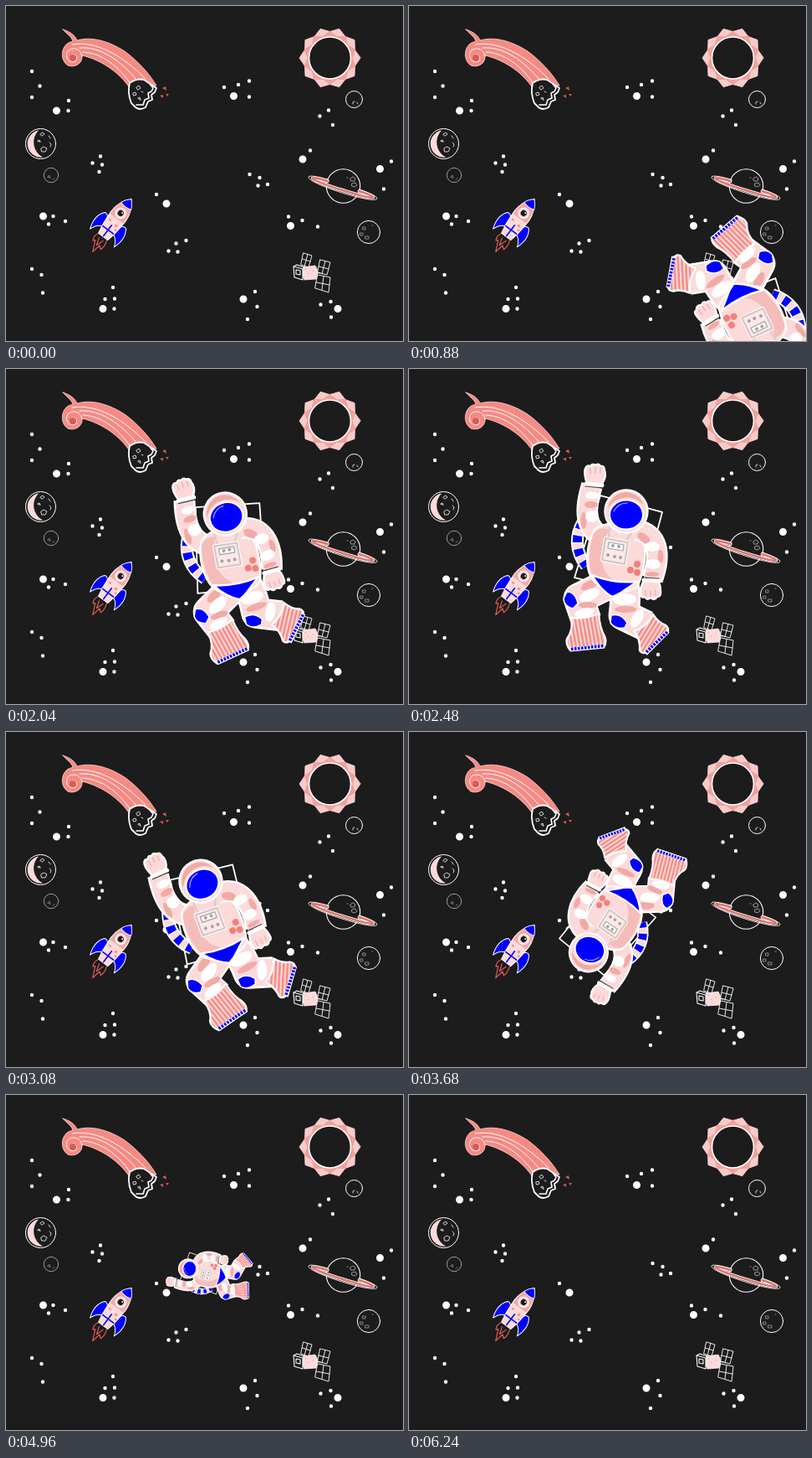
Animation of 475x400 px, one loop 6800 ms. Source, as an HTML page:

```html
<!DOCTYPE html>
<html lang="en">
<head>
<meta charset="utf-8">
<title>Drifting astronaut</title>
<style>
html, body { margin: 0; width: 100%; height: 100%; overflow: hidden; background: #1c1c1c; }
svg { display: block; width: 100%; height: 100%; stroke-linecap: round; stroke-linejoin: round; }
.n { fill: none; }
.bg { fill: #1c1c1c; }
.w { fill: #fff; }
.l { fill: #fbdad9; }
.m { fill: #f2aaa7; }
.s { fill: #f68a83; }
.b { fill: #00f; }
.k { stroke: #fff; }
.thin { stroke: #fff; stroke-width: .8; fill: none; }
.fat { stroke: #fff; stroke-width: 2.4; }
.flat { stroke-linecap: butt; }
.arm, .skin { fill: none; stroke-linecap: butt; }
.arm { stroke: #fff; stroke-width: 26; }
.skin { stroke: #fbdad9; stroke-width: 21; }
.leg .arm { stroke-width: 37; }
.leg .skin { stroke-width: 32; }
</style>
</head>
<body>
<svg viewBox="0 0 475 400">
<defs>
  <pattern id="rib" width="4.6" height="8" patternUnits="userSpaceOnUse" patternTransform="rotate(-10)">
    <path d="M0 0h4.6v8h-4.6z" class="l"/><path d="M0 0h2.5v8h-2.5z" class="s"/>
  </pattern>
  <pattern id="rib2" width="4.6" height="8" patternUnits="userSpaceOnUse" patternTransform="rotate(32)">
    <path d="M0 0h4.6v8h-4.6z" class="l"/><path d="M0 0h2.5v8h-2.5z" class="s"/>
  </pattern>
  <path id="hose" class="n" d="M208 183C199 198 198 217 212 235"/>
  <path id="armUp" d="M234 202C209 191 210 167 219 139"/>
  <path id="armLow" d="M271 192C298 196 302 222 291 251"/>
  <path id="legL" d="M236 258L203 274 212 300"/>
  <path id="legR" d="M257 256Q260 274 257 294L284 307"/>
</defs>

<!-- stars -->
<path class="n k" stroke-width="4.4" d="M31 78h0M40.5 95.5h0M31 109h0M75 113h0M74.500 125h0M113 179.500h0M103.500 187.500h0M115 189.500h0M111.500 198h0M56.500 251h0M51 260.500h0M71 257h0M31 314h0M42.500 321h0M44 342.500h0M128 336h0M118.500 350h0M130 349.500h0M129.500 361.500h0M180 225h0M215.500 280h0M203.500 283.500h0M205.500 293.500h0M194.500 292.500h0"/>
<path class="n k" stroke-width="4.4" d="M261 97h0M278 94h0M291 89.500h0M291 108.500h0M386 124.500h0M375.500 131.500h0M391 142h0M291.500 201h0M303.500 205h0M301.500 214.500h0M313 213h0M364 172.500h0M461 185.500h0M452 218.500h0M338 251.500h0M354.500 256h0M373 263.500h0M298 341h0M300.500 359h0M289 374h0M388.500 353h0M376.500 356.500h0M389 371.500h0"/>
<path class="n k" stroke-width="9" d="M60.500 125h0M44.500 251h0M116 361.500h0M192 236h0M272.500 107.500h0M355 183h0M447.500 194.500h0M340.500 262.500h0M284 350h0M397 361.500h0"/>

<!-- comet -->
<path class="s" stroke="#fbdad9" stroke-width=".8" d="M68 28C78 31 83 36 85 41 103 36 123 42 142 54 158 66 171 80 180 95L148 98C137 81 116 65 91 59 92 69 82 74 74 71 66 66 65 53 72 46 75 43 78 43 80 42 78 36 72 33 68 28Z"/>
<path class="n" stroke="#fff" stroke-width="1" d="M91 60C90 51 79 48 74 54 69 62 77 69 83 66 88 60 80 55 77 60M79 46C108 41 139 59 167 87M88 50C113 48 137 65 157 89M92 55C115 56 136 73 149 93"/>
<circle cx="80" cy="62" r="4" fill="#d95b55"/>
<path class="bg k" stroke-width="1.800" d="M148 92Q156 86 165 88L171 92 180 98 178 103 174 106 175 112 170 114 167 121Q160 125 155 121L150 116Q145 104 148 92Z"/>
<path class="n k" stroke-width="1.600" d="M172 93L176 98 174 102 170 104 171 110 166 112 164 118 156 118"/>
<path class="thin" d="M156 97l3-2 2 3-3 2zM152 104l3-1 1 3-3 1zM162 102l2 1M158 110l2-1 1 3z"/>
<path fill="#d9564f" d="M187 98l4-2 1 5zM191 105l4 0-2 3zM184 107l4-1 0 4z"/>

<!-- sun -->
<path id="rays" fill="#f8cac8" stroke="#fbdad9" stroke-width=".8"/>
<path id="rays2" fill="#f0a19d"/>
<circle class="bg k" stroke-width="1.600" cx="387.500" cy="62" r="25"/>

<!-- planets -->
<g class="bg k" stroke-width="1">
  <circle cx="416.500" cy="111.500" r="10"/>
  <circle cx="41.500" cy="164.500" r="18"/>
  <circle cx="54" cy="202" r="8.700" style="stroke:#999"/>
  <circle cx="434" cy="270" r="13.600"/>
</g>
<path class="l" d="M39 148.500A16.200 16.200 0 0 0 44 180.500 20 20 0 0 1 39 148.500Z"/>
<path class="thin" d="M41 153l3-2 2 2-3 2zM51 155l2 3M42 170l3-2 4 2-2 4-4 0zM52 163l2 2-1 3M38 161l2-1 1 2zM415 117q-1-3 2-3M420 115l1 2"/>
<path class="n" stroke="#999" stroke-width=".7" d="M50 204l2-2 1 3zM56 207l2-1"/>
<path class="n" stroke="#ccc" stroke-width=".6" d="M427 264h3v3h-3zM424 271h3v3h-3zM430 275h4v3h-4zM438 262h1"/>
<circle class="bg k" stroke-width="1.100" cx="403.500" cy="215" r="20.200"/>
<path class="n" stroke="#ccc" stroke-width=".7" d="M412 206l3-2 3 2-1 3-4 0zM414 212l4-1 2 3-3 2-3-1zM408 205h1"/>
<g transform="translate(403 217) rotate(17.500)" fill="none">
  <path class="k" stroke-width=".8" d="M-19-4C-34-4-43-2-43 0 -43 8 43 8 43 0 43-2 34-4 19-4"/>
  <path stroke="#fff" stroke-width="4.200" d="M-20-2C-31-2-38-1-38 0 -37 4 37 4 38 0 38-1 31-2 20-2"/>
  <path stroke="#e0736c" stroke-width="2.600" d="M-20-2C-31-2-38-1-38 0 -37 4 37 4 38 0 38-1 31-2 20-2"/>
</g>

<!-- rocket -->
<g transform="translate(130 257) rotate(37)">
  <path class="bg" stroke="#dc5a52" stroke-width="1.200" d="M-7 24Q-10 29-7 34L-5 32 1 45 3 34 7 37Q9 31 6 24M-3 27L0 36 3 27"/>
  <path class="b k" stroke-width="1" d="M-9 2Q-13-3-16-1-24 9-18 25-15 16-9 14ZM9 2Q13-3 16-1 24 9 18 25 15 16 9 14Z"/>
  <path class="l k" stroke-width="1" d="M0-33Q10-23 10.500-8 10 9 7 23H-7Q-10 9-10.500-8-10-23 0-33Z"/>
  <path class="m" d="M-7-23Q-10-15-9.800-4L9.800-4Q10-16 7-23Z"/>
  <path class="b k" stroke-width=".8" d="M0-33Q5-29 7.500-23Q0-20-7.500-23-5-29 0-33Z"/>
  <circle class="l k" cy="-12" r="6.200"/><circle class="bg" cy="-12" r="3.600"/><circle class="w" cx="1.400" cy="-13.500" r="1"/>
  <path class="n" stroke="#00f" stroke-width="1.600" d="M0 6V22M-8 13H8"/>
  <path class="s" d="M3 2h3v3h-3zM6 7h3v2h-3zM-7 1h3v2h-3z"/>
</g>

<!-- satellite -->
<path class="bg k" stroke-width=".9" d="M356 295L366 298 362 312 353 309ZM361 296.500L357 311M354.500 302L364 305M376 303L388 306 384 321 373 318ZM382 304.500L378 320M374 311L386 314M373 321L388 324 386 342 370 337ZM380 323L378 339M371 330L387 333"/>
<path class="n k" stroke-width="1" d="M368 318l8 1"/>
<path class="l k" stroke-width=".7" d="M356 312L370 310Q375 317 371 326L357 327Q353 319 356 312Z"/>
<path class="bg k" stroke-width="1.100" d="M344 311L355 314 355 327 345 324ZM347 315l5 1v5l-5-1zM344 311L348 309 357 312"/>
<path class="s" d="M358 314h1v1h-1zM361 319h1v1h-1zM367 316h1v1h-1z"/>

<!-- astronaut, drawn around its middle -->
<g id="man" visibility="hidden"><g transform="translate(-247 -225)">
  <path class="bg k" stroke-width="1.800" d="M229 151L303 171 277 268 198 249Z"/>
  <g class="flat">
    <use href="#hose" stroke="#fff" stroke-width="15"/>
    <use href="#hose" stroke="#fbdad9" stroke-width="11"/>
    <use href="#hose" stroke="#fff" stroke-width="11" stroke-dasharray="10.500 5.500"/>
    <use href="#hose" stroke="#00f" stroke-width="11" stroke-dasharray="8 8" stroke-dashoffset="-1.200"/>
  </g>

  <g class="leg">
    <use href="#legR" class="arm"/><use href="#legR" class="skin"/>
    <use href="#legL" class="arm"/><use href="#legL" class="skin"/>
  </g>
  <ellipse class="m" cx="216" cy="258" rx="11" ry="5" transform="rotate(-25 216 258)"/>
  <ellipse class="w" cx="216" cy="270" rx="13" ry="7" transform="rotate(-25 216 270)"/>
  <ellipse class="m" cx="214" cy="282" rx="11" ry="4"/>
  <ellipse class="w" cx="210" cy="291" rx="12" ry="5.500" transform="rotate(-12 210 291)"/>
  <ellipse class="w" cx="258" cy="275" rx="14" ry="7"/>
  <ellipse class="m" cx="259" cy="287" rx="13" ry="4"/>
  <ellipse class="w" cx="273" cy="298" rx="12" ry="6" transform="rotate(-60 273 298)"/>
  <path class="b k" stroke-width="1.500" d="M189 266Q199 266 202 280L196 286Q185 283 185 274Z"/>
  <path class="b k" stroke-width="1.500" d="M242 294Q254 291 261 303L258 309Q246 311 241 303Z"/>

  <path class="fat" fill="url(#rib)" d="M194 297Q211 299 227 292 228 309 234 319 237 327 233 332L193 336Q187 328 189 322 197 312 194 297Z"/>
  <path class="n k flat" stroke-width="5" d="M193 335L234 331"/>
  <path class="n flat" stroke="#00f" stroke-width="3.600" stroke-dasharray="2.600 1.400" d="M194 334.500L233 330.500"/>
  <path class="fat" fill="url(#rib2)" d="M270 313Q284 308 292 293 298 303 307 306 312 310 309 315L285 338Q279 341 276 336 277 324 270 313Z"/>
  <path class="n k flat" stroke-width="5" d="M283 340L310 313"/>
  <path class="n flat" stroke="#00f" stroke-width="3.600" stroke-dasharray="2.600 1.400" d="M284 338L309 314"/>

  <use href="#armUp" class="arm"/><use href="#armUp" class="skin"/>
  <ellipse class="m" cx="209" cy="181" rx="3.500" ry="10"/>
  <ellipse class="w" cx="219" cy="176" rx="8" ry="7"/>
  <ellipse class="m" cx="218" cy="162" rx="8" ry="4"/>
  <ellipse class="w" cx="219" cy="151" rx="8" ry="4.500"/>

  <path class="l fat" d="M222 192C235 180 272 182 281 199 285 220 281 243 273 260 254 272 230 266 218 249 209 232 214 205 222 192Z"/>
  <path class="m" d="M221 196Q231 187 240 192 229 207 231 232 234 245 243 251 228 251 219 246 212 222 221 196Z" opacity=".6"/>
  <path class="b fat" d="M219 246Q244 256 273 254L258 264Q252 269 243 272 229 264 219 246Z"/>

  <use href="#armLow" class="arm"/><use href="#armLow" class="skin"/>
  <ellipse class="m" cx="281" cy="202" rx="9" ry="5" transform="rotate(40 281 202)"/>
  <ellipse class="w" cx="291" cy="212" rx="9" ry="6"/>
  <ellipse class="m" cx="301" cy="224" rx="3.500" ry="8"/>
  <ellipse class="w" cx="292" cy="233" rx="9" ry="6"/>
  <ellipse class="m" cx="291" cy="245" rx="8" ry="3"/>
  <path class="n" stroke="#f3807a" stroke-width="8" d="M265 240h0M273 233h0M273 243h0"/>

  <path class="n" stroke="#d8cfcf" stroke-width="2.400" d="M239 203L240 188M259 206L268 193"/>
  <path fill="#fbe8e7" stroke="#fff" stroke-width="4" d="M235 202L262 207 258 233 231 228Z"/>
  <path fill="#fbe8e7" stroke="#cfc6c6" stroke-width="2" d="M235 202L262 207 258 233 231 228Z"/>
  <path fill="#fff" stroke="#a9a0a0" stroke-width="1.200" d="M239 207L257 210 256 217 238 214Z"/>
  <path class="n" stroke="#aaa1a1" stroke-width="4" d="M244 211h0M251 212h0M238 222h0M246 224h0M253 225h0"/>

  <ellipse class="l fat" cx="260" cy="170" rx="25.500" ry="25.500"/>
  <path class="m" d="M238 167A22 22 0 0 1 281 163 26 26 0 0 0 238 167Z"/>
  <ellipse class="b k" stroke-width="2" cx="260" cy="174" rx="20" ry="17.500"/>
  <path class="n" stroke="#bcbcff" stroke-width="1" d="M245 170Q250 160 261 160"/>

  <path class="l fat" d="M213 137Q208 122 212 117 215 114 217 117 219 112 223 115 227 112 229 116 234 115 234 121 237 128 231 137Z"/>
  <path class="n" stroke="#f2aaa7" stroke-width="1.200" d="M217 118v7M223 117v7M229 118v6"/>
  <path class="n k" stroke-width="5" d="M212 137L231 139"/>
  <path class="n" stroke="#444" stroke-width="1.200" d="M211 140L231 142"/>
  <path class="l fat" d="M281 253Q276 261 277 269 278 274 282 272 285 277 289 273 294 277 297 272 302 272 301 265 301 258 298 253Z"/>
  <path class="n" stroke="#f2aaa7" stroke-width="1.200" d="M283 264v7M289 265v7M295 264v7"/>
  <path class="n k" stroke-width="5" d="M281 252L299 253"/>
  <path class="n" stroke="#444" stroke-width="1.200" d="M281 249L299 250"/>
</g></g>
</svg>
<script>
const $ = id => document.getElementById(id);
const LOOP = 6800, IN = 560, MID = 3400, OUT = 6240;

function star(count, r1, r2, turn) {
  let d = "";
  for (let i = 0; i < count * 2; i++) {
    const a = Math.PI * i / count + turn, r = i % 2 ? r2 : r1;
    d += (i ? "L" : "M") + (387.5 + r * Math.cos(a)).toFixed(2) + " " + (62 + r * Math.sin(a)).toFixed(2);
  }
  return d + "Z";
}
$("rays").setAttribute("d", star(10, 36.5, 31.5, 0));
$("rays2").setAttribute("d", star(10, 32.5, 27, Math.PI / 10));

// [time, value] pairs joined by a smooth curve
function curve(keys) {
  const slope = i => {
    const a = keys[Math.max(i - 1, 0)], b = keys[Math.min(i + 1, keys.length - 1)];
    return (b[1] - a[1]) / (b[0] - a[0]);
  };
  return t => {
    let i = 0;
    while (i < keys.length - 2 && t > keys[i + 1][0]) i++;
    const [t0, v0] = keys[i], [t1, v1] = keys[i + 1];
    const h = t1 - t0, u = (t - t0) / h, w = 1 - u;
    return v0 * (1 + 2 * u) * w * w + h * slope(i) * u * w * w
         + v1 * u * u * (3 - 2 * u) - h * slope(i + 1) * u * u * w;
  };
}

const posX = curve([[560, 445], [880, 412], [1240, 373], [1640, 336], [2000, 272], [2480, 247],
  [3400, 250], [3680, 246], [4180, 247], [4900, 243], [5600, 231], [6240, 219]]);
const posY = curve([[560, 466], [880, 373], [1240, 287], [1640, 238], [2000, 230], [2480, 225],
  [3400, 235], [3680, 223], [4180, 227], [4900, 216], [5600, 200], [6240, 184]]);
const sway = curve([[560, -269], [880, -215], [1640, -86], [2000, -23], [2480, 0], [3400, -48]]);

function draw() {
  const t = performance.now() % LOOP, man = $("man");
  const shown = t > IN && t < OUT;
  man.setAttribute("visibility", shown ? "visible" : "hidden");
  if (shown) {
    const turn = t < MID ? sway(t) : -48 + .898 * (t - MID);
    const size = Math.min(1, (OUT - t) / (OUT - MID));
    man.setAttribute("transform", `translate(${posX(t)} ${posY(t)}) rotate(${turn}) scale(${size})`);
  }
  requestAnimationFrame(draw);
}
draw();
</script>
</body>
</html>
```
